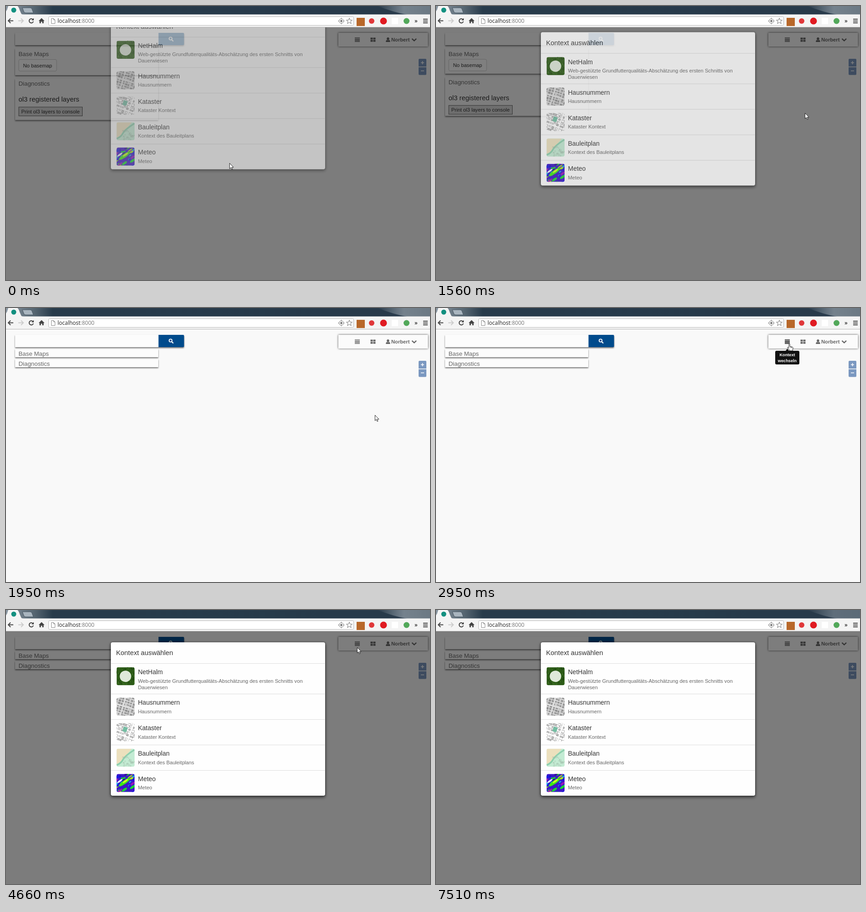
These frames come from a looping animation (930 by 602 pixels, 7610 ms). An HTML page:

```html
<!DOCTYPE html>
<html lang="de">
<head>
<meta charset="utf-8">
<title>Kontext auswählen</title>
<style>
  html, body { margin: 0; width: 100%; height: 100%; overflow: hidden; background: #f9f9f9; }
  svg { display: block; }
  text { font-family: "Liberation Sans", Arial, sans-serif; fill: #333; }
  .heading { font-size: 14.8px; }
  .title { font-size: 14px; }
  .small { font-size: 11.2px; }
  .label { font-size: 13.3px; fill: #666; }
  .sub { font-size: 11.2px; fill: #666; }
  .bold { font-weight: bold; }
  .raised { filter: drop-shadow(0 2px 1.5px rgba(0,0,0,.55)); }
  .framed { filter: drop-shadow(0 0 2px rgba(0,0,0,.7)); }
  .glow { filter: drop-shadow(0 3px 3px rgba(0,0,0,.5)) drop-shadow(0 0 2px rgba(0,0,0,.4)); }
  .url { font: 12px "Open Sans", sans-serif; fill: #222; }
  .line { fill: none; stroke: #444; stroke-width: 2; }
</style>
</head>
<body>
<svg id="stage" width="930" height="602" viewBox="0 0 930 602">
  <defs>
    <linearGradient id="strip">
      <stop offset="0" stop-color="#8b98a3"/><stop offset=".07" stop-color="#53636f"/>
      <stop offset=".11" stop-color="#283b4b"/><stop offset=".9" stop-color="#283a4a"/>
      <stop offset="1" stop-color="#34475a"/>
    </linearGradient>
    <linearGradient id="shine">
      <stop offset="0" stop-color="#7c8994" stop-opacity="0"/><stop offset=".5" stop-color="#75828d"/>
      <stop offset="1" stop-color="#6c7984"/>
    </linearGradient>
    <clipPath id="thumbShape"><rect width="39.5" height="39.5" rx="4"/></clipPath>
  </defs>

  <rect width="930" height="602" fill="#f9f9f9"/>

  <g class="raised"><svg id="diagnostics" x="20" width="314">
    <rect width="314" height="200" fill="#fcfcfc"/>
    <g class="content">
      <text class="label" x="7.5" y="16">Diagnostics</text>
      <text class="heading" x="7.5" y="51">ol3 registered layers</text>
      <rect x="8" y="62.5" width="139.500" height="19.500" fill="#ddd" stroke="#666"/>
      <text class="small" x="13.500" y="76.200">Print ol3 layers to console</text>
    </g>
  </svg></g>
  <g class="raised"><svg id="baseMaps" x="20" width="314">
    <rect width="314" height="200" fill="#fcfcfc"/>
    <g class="content">
      <text class="label" x="7.5" y="17">Base Maps</text>
      <rect x="8" y="24.500" width="83" height="25.500" rx="3" fill="#fff" stroke="#ccc"/>
      <text class="small" x="17.500" y="41.500">No basemap</text>
    </g>
  </svg></g>

  <g class="raised">
    <path d="M20 59H335V86H20Z" fill="#fcfcfc"/>
    <path d="M334.500 59H388.500a2 2 0 0 1 2 2V84a2 2 0 0 1 -2 2H334.500Z" fill="#004b8c"/>
  </g>
  <path d="M363.500 74L367 77.500" stroke="#fff" stroke-width="2.200"/>
  <circle cx="361" cy="71.500" r="3.200" fill="none" stroke="#fff" stroke-width="1.800"/>

  <rect class="framed" x="729" y="59" width="196.500" height="30" rx="1" fill="#fbfbfb"/>
  <path id="listIcon" d="M765 70H776M765 72.700H776M765 75.400H776M765 78H776" stroke-width="1.600"/>
  <path d="M799.500 69.500h5v4h-5zm6 0h5v4h-5zm-6 5h5v4h-5zm6 0h5v4h-5z" fill="#666"/>
  <path d="M835.200 72a2.700 3 0 0 1 5.400 0 2.700 3 0 0 1 -5.400 0ZM833.300 79v-2q.4-2 2.200-2.300 2.400 1.600 4.800 0 1.900.3 2.200 2.300v2Z" fill="#666"/>
  <text class="small bold" x="845" y="77.800" style="fill:#666">Norbert</text>
  <path d="M890.500 71.800L895.300 76.300L900 71.800" fill="none" stroke="#666" stroke-width="2.400"/>

  <path d="M905 118a2 2 0 0 1 2-2H920a2 2 0 0 1 2 2V133H905ZM905 134.500H922V149.500a2 2 0 0 1 -2 2H907a2 2 0 0 1 -2 -2Z" fill="#7b98c0"/>
  <path d="M910 124.500H917M913.500 121V128M910 142.500H917" stroke="#fff" stroke-width="1.600"/>

  <rect id="backdrop" y="47" width="930" height="555" opacity=".5"/>

  <g id="tooltip">
    <path d="M766.500 94.500L770.500 89.500L774.500 94.500Z" fill="#111"/>
    <rect x="744" y="94" width="53" height="30" rx="3" fill="#111"/>
    <g class="bold" font-size="9.200" text-anchor="middle">
      <text x="770.500" y="106" style="fill:#fff">Kontext</text>
      <text x="770.500" y="118.500" style="fill:#fff">wechseln</text>
    </g>
  </g>

  <g id="modal">
    <rect class="glow" x="230" y="71" width="470" height="337" rx="4" fill="#fefefe"/>
    <text class="heading" x="241.500" y="99">Kontext auswählen</text>
    <rect id="hover" x="230.500" width="469" fill="#f4f4f4"/>
    <rect id="trace" x="230.500" y="345.500" width="469" height="6" fill="#f3f3f3"/>
    <g id="rows"></g>
  </g>

  <g id="browser">
    <rect width="930" height="19" fill="url(#strip)"/>
    <path id="shineShape" d="M815 0H930V19H880Q850 14 815 0Z" fill="url(#shine)"/>
    <path d="M36 4H53Q56 4 57 7L60 15H43Q40 15 39 12Z" fill="#a9b5bf" stroke="#3c4a56" stroke-width=".8"/>
    <path d="M0 12Q3 8 4 3L5 0H25Q28 2 30 9L33 16Q34 19 39 19H0Z" fill="#f5f5f5"/>
    <circle cx="17" cy="9" r="5.500" fill="#139080"/>
    <rect y="18.500" width="930" height="27.500" fill="#f4f4f4"/>
    <path d="M0 46.500H930" stroke="#b5b5b5"/>
    <rect x="93.500" y="23.500" width="669" height="19" rx="2" fill="#fff" stroke="#b8b8b8"/>
    <path class="line" d="M16 32.500H5.500M10 27.500L5 32.500L10 37.500"/>
    <path class="line" d="M27 32.500H37.500M33 27.500L38 32.500L33 37.500" style="stroke:#ccc"/>
    <path class="line" d="M59.300 29.800A4.700 4.700 0 1 0 60 34"/>
    <path d="M61 26.500V31.500H56Z" fill="#444"/>
    <path d="M78 26.500L84.500 33H82.500V38H79.500V34.500H76.500V38H73.500V33H71.500Z" fill="#444"/>
    <path d="M99.500 27.500H104.500L107.500 30.500V38.500H99.500ZM104.500 27.500V30.500H107.500" fill="#fff" stroke="#888"/>
    <text class="url" x="113" y="37">localhost<tspan fill="#777">:8000</tspan></text>
    <g fill="none" stroke="#777">
      <circle cx="735.500" cy="33" r="5"/><circle cx="735.500" cy="33" r="2" fill="#777"/>
      <path d="M735.500 26V28M735.500 38V40M728.500 33H730.500M740.500 33H742.500"/>
      <path d="M753 26.500L754.800 31H759.500L755.800 34L757.200 38.800L753 36L748.800 38.800L750.200 34L746.500 31H751.200Z"/>
    </g>
    <rect x="769" y="26" width="18" height="18" fill="#b8682a"/>
    <circle cx="802" cy="33" r="6" fill="#e0383a"/>
    <circle cx="828" cy="33" r="7.500" fill="#e01b22"/>
    <rect x="846" y="26" width="14" height="14" fill="#fff"/>
    <circle cx="878.500" cy="33" r="6.500" fill="#52a85a"/>
    <text x="896" y="36.500" font-size="12" class="bold">»</text>
    <path class="line" d="M915 29H925M915 33H925M915 37H925"/>
  </g>

  <g id="cursor" stroke="#111" stroke-width=".9" fill="#fff" stroke-linejoin="round">
    <path id="arrow" d="M.4 .4V12.500L3.200 9.900L5.200 14.300L7 13.500L5.200 9.300H9Z"/>
    <path id="hand" d="M-1 1.500C-1-.1 1.200-.1 1.200 1.500V6.500L6.500 7.600C7.800 8 8.300 8.800 8.100 10L7.300 13.500V16H.2V14L-4 9.600C-4.800 8.400-3.400 7.600-2.400 8.400L-1 9.600ZM3 7V9.500M5.200 7.500V9.700"/>
  </g>
</svg>

<script>
const $ = id => document.getElementById(id);
const set = (id, attrs) => { for (const k in attrs) $(id).setAttribute(k, attrs[k]); };
const show = (id, on) => $(id).style.display = on ? '' : 'none';
const clamp = v => Math.min(1, Math.max(0, v));
const mix = (a, b, k) => a + (b - a) * k;

function seeded(seed) {
  return () => (seed = seed * 16807 % 2147483647) / 2147483647;
}

// ---- thumbnails ----
const repeat = (n, fn) => Array.from({length: n}, (_, i) => fn(i)).join('');
const fill = color => `<rect width="40" height="40" fill="${color}"/>`;
const turned = (deg, body) => `<g transform="rotate(${deg} 20 20)">${body}</g>`;

function grass() {
  const rnd = seeded(71);
  return fill('#2c5a17') + repeat(90, i => {
    const x = rnd() * 40, y = rnd() * 40;
    return `<path d="M${x} ${y}l${rnd() * 4 - 2} -4" stroke="${['#17390d', '#47792a', '#326a1b'][i % 3]}"/>`;
  }) + '<circle cx="19.500" cy="20" r="12.500" fill="#dfe9da"/>';
}

function houses() {
  const rnd = seeded(39);
  return fill('#d0d0d0') + turned(17, repeat(64, i => {
    const x = i % 8 * 6.500 - 5, y = (i >> 3) * 6 - 4;
    return `<rect x="${x}" y="${y}" width="${2.500 + rnd() * 3}" height="${2 + rnd() * 3}" fill="#8e8e8e"/>`;
  }) + '<path d="M-8 20H48M14 -8V48" stroke="#dedede" stroke-width="3"/>');
}

function parcels() {
  const rnd = seeded(52);
  return fill('#fafafa') + turned(20, repeat(56, i => {
    const x = i % 7 * 7.500 - 6, y = (i >> 3) * 7 - 4;
    return `<rect x="${x}" y="${y}" width="${3 + rnd() * 5}" height="${2 + rnd() * 4}" fill="${i % 3 ? '#fff' : '#c4c4c4'}" stroke="#777" stroke-width=".6"/>`;
  }) + '<path d="M-8 29H50M30 -8V50" stroke="#fff" stroke-width="3"/><rect x="12" y="9" width="9" height="11" fill="#74bda3"/>');
}

function zoning() {
  const rnd = seeded(23);
  return fill('#c3ebd3') +
    '<path d="M0 0H33L22 14Q12 20 9 30L0 34Z" fill="#ece0bd"/>' +
    '<path d="M0 36Q10 32 14 24T40 2" fill="none" stroke="#8ed0ae" stroke-width="3.500"/>' +
    repeat(26, () => `<circle cx="${14 + rnd() * 26}" cy="${18 + rnd() * 22}" r="${.6 + rnd() * 1.400}" fill="none" stroke="#9eb9a6" stroke-width=".6"/>`);
}

function weather() {
  const rnd = seeded(88);
  const colors = ['#1a1ae0', '#9a18b8', '#18d830', '#12b8e8', '#a8f010', '#3008a0'];
  return fill('#3d18c8') + turned(-35, repeat(75, i =>
    `<ellipse cx="${rnd() * 54 - 7}" cy="${rnd() * 54 - 7}" rx="${2 + rnd() * 5}" ry="${1 + rnd() * 1.700}" fill="${colors[i % 6]}"/>`) +
    '<ellipse cx="19" cy="17" rx="15" ry="4" fill="#3ce818"/><ellipse cx="22" cy="16" rx="7" ry="2" fill="#d8f820"/>' +
    '<ellipse cx="12" cy="9" rx="7" ry="2" fill="#e8f4ff"/>');
}

// ---- list ----
const rowEdges = [117.500, 184.500, 240.500, 296.500, 352, 408];
const rows = [
  ['NetHalm', ['Web-gestützte Grundfutterqualitäts-Abschätzung des ersten Schnitts von', 'Dauerwiesen'], grass],
  ['Hausnummern', ['Hausnummern'], houses],
  ['Kataster', ['Kataster Kontext'], parcels],
  ['Bauleitplan', ['Kontext des Bauleitplans'], zoning],
  ['Meteo', ['Meteo'], weather]
];
$('rows').innerHTML = rows.map(([title, lines, thumb], i) => {
  const y = rowEdges[i] + 8.200;
  return `<path d="M230.500 ${Math.floor(rowEdges[i]) + .5}H699.500" stroke="#ddd"/>
    <g transform="translate(242.500 ${y})" clip-path="url(#thumbShape)">${thumb()}</g>
    <text class="title" x="289.500" y="${y + 15.500}">${title}</text>` +
    lines.map((s, n) => `<text class="sub" x="289.500" y="${y + 33.800 + n * 14}">${s}</text>`).join('');
}).join('');

// ---- timing ----
const LOOP = 7610;
const OPEN_FIRST = -83, CLOSE = 1530, OPEN_AGAIN = 3805;

const bursts = [[0, 0, 1], [120, 280, 2], [580, 1560, 8], [1680, 1950, 3], [2410, 2950, 5],
  [3940, 4100, 2], [4530, 5550, 8], [5800, 6800, 8], [7510, 7510, 1]];
const refreshes = bursts.flatMap(([a, b, n]) =>
  Array.from({length: n}, (_, i) => n > 1 ? mix(a, b, i / (n - 1)) : a));

const route = [[0, 490, 345], [440, 490, 345], [580, 540, 348], [850, 784, 358], [1000, 828, 345],
  [1140, 830, 305], [1280, 816, 262], [1420, 809, 235], [2280, 809, 235], [2410, 807, 226],
  [2545, 798, 180], [2680, 786, 122], [2815, 777, 84], [2950, 775, 78], [4400, 775, 78],
  [4530, 770, 82], [4820, 715, 107], [5110, 650, 142], [5550, 609, 176], [5800, 611, 179],
  [5950, 627, 214], [6230, 705, 345], [6370, 760, 425], [6660, 852, 548], [6800, 890, 602], [LOOP, 890, 602]];

function cursorAt(t) {
  const i = route.findIndex(p => p[0] > t);
  const [t0, x0, y0] = route[i - 1], [t1, x1, y1] = route[i];
  const k = (t - t0) / (t1 - t0);
  return [mix(x0, x1, k), mix(y0, y1, k)];
}

function bezier(x1, y1, x2, y2) {
  const curve = (a, b, s) => 3 * a * s * (1 - s) ** 2 + 3 * b * s * s * (1 - s) + s ** 3;
  return x => {
    let lo = 0, hi = 1;
    for (let i = 0; i < 20; i++) {
      const s = (lo + hi) / 2;
      if (curve(x1, x2, s) < x) lo = s; else hi = s;
    }
    return curve(y1, y2, hi);
  };
}
const easeOut = bezier(0, 0, .58, 1);
const ease = bezier(.25, .1, .25, 1);

function modalAt(t) {
  const closing = t >= CLOSE && t < OPEN_AGAIN;
  const elapsed = t - (closing ? CLOSE : t < CLOSE ? OPEN_FIRST : OPEN_AGAIN);
  const slide = easeOut(clamp(elapsed / 300)), fade = clamp(elapsed / 150);
  return {
    offset: -84 * (closing ? slide : 1 - slide),
    opacity: closing ? 1 - fade : fade,
    ready: !closing && elapsed > 290
  };
}

function placePanel(id, top, bottom, lift, k) {
  const y = mix(...top, k);
  set(id, {y, height: mix(...bottom, k) - y});
  $(id).querySelector('.content').setAttribute('transform', `translate(0 ${-lift * k})`);
}

function draw(time) {
  const t = refreshes.filter(r => r <= time + .01).pop();

  const folded = ease(clamp((t - CLOSE) / 350));
  placePanel('baseMaps', [93, 90], [152, 108], 2.500, folded);
  placePanel('diagnostics', [159.500, 112], [250.500, 130], 1.500, folded);

  const modal = modalAt(t);
  show('backdrop', t < 1950 || t >= 3940);
  set('modal', {transform: `translate(0 ${modal.offset})`, opacity: modal.opacity});

  const [x, y] = cursorAt(t);
  const row = modal.ready && x > 230 && x < 700 ? rowEdges.findIndex((e, i) => y >= e && y < rowEdges[i + 1]) : -1;
  show('hover', row >= 0);
  if (row >= 0) set('hover', {y: rowEdges[row], height: rowEdges[row + 1] - rowEdges[row]});
  show('trace', t > 700 && t < CLOSE);

  const onIcon = t >= 2810 && t < 4530;
  show('tooltip', t >= 2950 && t < 4530);
  set('listIcon', {stroke: onIcon ? '#111' : '#666'});

  const pointing = row >= 0 || onIcon;
  show('hand', pointing);
  show('arrow', !pointing);
  set('cursor', {transform: `translate(${x} ${y})`});
  set('shineShape', {opacity: t >= 7510 ? .7 : 1});
}

const start = performance.now();
function tick() {
  draw((performance.now() - start) % LOOP);
  requestAnimationFrame(tick);
}
tick();
</script>
</body>
</html>
```
